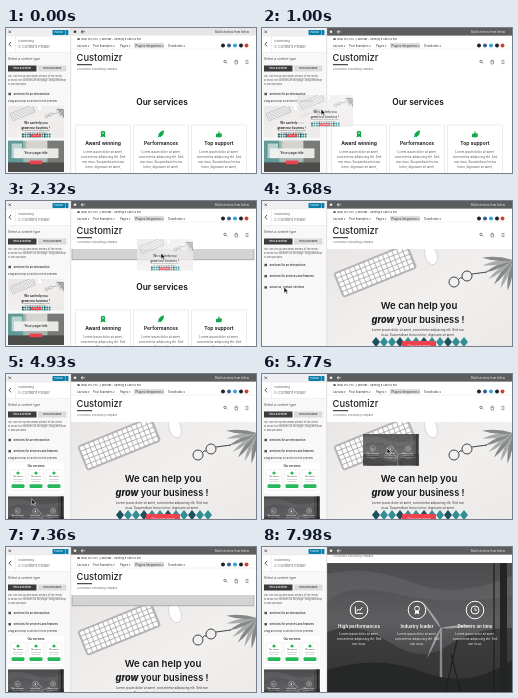
An HTML page for the animation above (8 s loop, 250x145 px).

```html
<!DOCTYPE html>
<html lang="en">
<head>
<meta charset="utf-8">
<title>Section builder</title>
<style>
html, body { margin: 0; width: 100%; height: 100%; overflow: hidden; background: #fff; }
svg { display: block; width: 100vw; height: 100vh; }
text { font-family: Inter, "Open Sans", sans-serif; white-space: pre; }
</style>
</head>
<body>
<svg id="stage" viewBox="0 0 250 145"></svg>
<script>
const LOOP = 8000, W = 185;
const stage = document.getElementById('stage');

const rect = (x, y, w, h, fill, more = '') =>
  `<rect x="${x}" y="${y}" width="${w}" height="${h}" fill="${fill}" ${more}/>`;
const dot = (x, y, r, fill, more = '') => `<circle cx="${x}" cy="${y}" r="${r}" fill="${fill}" ${more}/>`;
const path = (d, fill, more = '') => `<path d="${d}" fill="${fill}" ${more}/>`;
const line = (d, color, w, more = '') => path(d, 'none', `stroke="${color}" stroke-width="${w}" ${more}`);
const text = (x, y, size, str, fill = '#333', more = '') =>
  `<text x="${x}" y="${y}" font-size="${size}" fill="${fill}" ${more}>${str}</text>`;
const group = (body, more = '') => `<g ${more}>${body}</g>`;
const at = (x, y, more = '') => `transform="translate(${x} ${y})" ${more}`;
const MID = ' text-anchor="middle" ';
const BOLD = ' font-weight="600" ';
const lines = (x, y, step, size, rows, fill, more = MID) =>
  rows.map((row, i) => text(x, y + i * step, size, row, fill, more)).join('');

const LOREM = ['Lorem ipsum dolor sit amet,', 'consectetur adipiscing elit. Sed',
  'non risus. Suspendisse lectus', 'tortor, dignissim sit amet,'];
const COLUMNS = [32, 90, 148];

// Page sections, each drawn from its own top left corner
function services() {
  const icons = [
    dot(0, -1, 2.3, '#12a84a') + path('M-1.6 0L-2.6 3.6L0 2.4L2.6 3.6L1.6 0Z', '#12a84a') + dot(0, -1, .8, '#fff'),
    path('M3 -3.4C-.5 -3 -2 -1 -2.8 1.2L-.8 3.2C1.6 2 3 0 3 -3.4ZM-3.4 3.4L-2.4 1.6L-1.4 2.8Z', '#12a84a'),
    path('M-3 0L-.8 -.6L0 -3.4L.9 -.6L3 -.6L2.4 3.2L-3 3.2Z', '#12a84a')];
  const heads = ['Award winning', 'Performances', 'Top support'];
  return rect(0, 0, W, 110, '#fff') +
    text(91, 29.5, 8.4, 'Our services', '#111', MID + BOLD) +
    COLUMNS.map((x, i) => rect(x - 27.5, 50, 55, 60, '#fff', 'stroke="#e2e2e2" stroke-width=".6"') +
      group(icons[i], at(x, 59)) +
      text(x, 70.4, 5, heads[i], '#111', MID + BOLD) +
      lines(x, 77.6, 5, 3, LOREM, '#555')).join('');
}

function hero() {
  let keys = '', leaves = '', scales = '';
  for (let r = 0; r < 5; r++)
    for (let c = 0; c < 15; c++) keys += rect(2 + c * 5.1, 2 + r * 4.8, 4.2, 3.9, '#fdfdfd', 'rx=".6"');
  for (let i = 0; i < 7; i++)
    leaves += path('M0 0Q16 -4 31 0Q16 4 0 0Z', i % 2 ? '#a9aba9' : '#858987', `transform="translate(186 12) rotate(${100 + i * 14})"`);
  for (let i = 0; i < 24; i++)
    scales += path('M0 0L4 -5L8 0L4 5Z', i % 3 ? '#2f8f95' : '#1e4f5c', at(45 + i % 12 * 8, 94 + 8 * (i > 11)));
  return rect(0, 0, W, 110, 'url(#desk)') +
    group(rect(0, 0, 80, 27, '#b5b3b4', 'rx="3"') + keys, 'transform="translate(6 25) rotate(-22)"') +
    '<ellipse cx="104" cy="7" rx="6" ry="10" fill="#fff" stroke="#cfcdcc" stroke-width=".7" transform="rotate(-18 104 7)"/>' +
    leaves +
    dot(127, 34, 5, 'none', 'stroke="#444" stroke-width="1"') +
    dot(140, 28, 5, 'none', 'stroke="#444" stroke-width="1"') +
    line('M131.500 31.500Q133 29 135.500 30M145 26L160 24', '#444', 1) + scales +
    text(92, 60.7, 9.6, 'We can help you', '#161616', MID + BOLD) +
    text(91, 74.7, 9.2, '<tspan font-weight="800" font-style="italic">grow</tspan> your business !', '#161616', MID + BOLD) +
    lines(91, 83.2, 5, 3.05, ['Lorem ipsum dolor sit amet, consectetur adipiscing elit. Sed non',
      'risus. Suspendisse lectus tortor, dignissim sit amet.'], '#333') +
    rect(75, 93, 34, 9, '#f0414c', 'rx="1"') + text(92, 98.800, 3.4, 'Discover more', '#fff', MID);
}

const turbine = (x, y, s) => group(
  path('M-1 0L-1.500 95H1.500L1 0Z', '#bfc0c2') +
  [-35, 85, 205].map(a => path('M0 0Q2.5 -9 0 -34Q-2 -9 0 0Z', '#cfd0d2', `transform="rotate(${a})"`)).join(''),
  `transform="translate(${x} ${y}) scale(${s})" opacity=".6"`);

function features() {
  const icons = [
    line('M-3.6 -3.4V3.4H3.8M-2.4 1.4L-.6 -1L.8 .4L3.4 -2.8', '#fff', 1),
    dot(0, -1.4, 2.4, 'none', 'stroke="#fff"') + path('M-1.7 .6L-2.3 4.4L0 3.2L2.3 4.4L1.7 .6Z', '#fff'),
    dot(0, 0, 4, 'none', 'stroke="#fff"') + line('M0 -2.4V.3H2', '#fff', .9)];
  const heads = ['High performances', 'Industry leader', 'Delivers on time'];
  return rect(0, 0, W, 132, 'url(#fog)') +
    path('M0 12Q40 2 84 20T185 14V34Q120 44 70 32T0 40Z', '#6c6b6d', 'opacity=".45"') +
    path('M0 70Q30 58 62 80T120 84T185 66V132H0Z', '#353536', 'opacity=".75"') +
    turbine(114, 66, 1) +
    path('M0 108Q50 92 96 110T185 98V132H0Z', '#262827') +
    line('M118 132L130 78M134 132L124 92M167 0V132', '#1d1f1e', 1.2) + rect(173, 0, 7, 132, '#232524') +
    COLUMNS.map((x, i) => group(dot(0, 0, 8.8, 'none', 'stroke="#fff" stroke-width="1"') + icons[i], at(x, 48)) +
      text(x, 65.6, 4.5, heads[i], '#fff', MID + BOLD) +
      lines(x, 73.2, 4.700, 3, [LOREM[0], LOREM[1], 'non risus.'], '#f4f4f4')).join('');
}

function office() {
  return rect(0, 0, W, 98, '#a9b3b0') + rect(0, 0, 50, 98, '#5f9a98') + rect(60, 0, 70, 34, '#d5d4cf') +
    rect(130, 0, 55, 98, '#777a77') + rect(0, 72, W, 32, '#4c4d4b') + rect(12, 10, 34, 48, '#bdd3d0') +
    rect(20, 26, 146, 32, '#f4f4f2', 'opacity=".9"') +
    text(92, 46, 11, 'Your page title', '#333', MID + BOLD) + rect(72, 66, 40, 12, '#f0414c');
}

const header = () => rect(0, 0, W, 40, '#fff') +
  text(6, 4.3, 2.5, '☎ (555) 010-724  ◷ Monday - Opening 9 AM to 6 PM', '#222') +
  rect(63, 6.9, 30, 5.2, '#dedede') +
  [[6, 'Layouts ▾'], [22, 'Post Examples ▾'], [49, 'Pages ▾'], [64.5, 'Plugins Integrations ▾'], [97, 'Downloads ▾']]
    .map(([x, s]) => text(x, 10.6, 2.8, s, '#333')).join('') +
  [['#222', 152], ['#3b5998', 158], ['#38a1db', 164], ['#222', 170], ['#d0402f', 175.5]]
    .map(([c, x]) => dot(x, 9.4, 2, c)).join('') +
  line('M0 13H185', '#e4e4e4', .5) +
  text(5.5, 25, 9.4, 'Customizr', '#222', 'font-weight="500"') + rect(6, 28.2, 15, 1, '#222') +
  text(6, 34, 2.7, 'A business consulting company', '#666') +
  dot(154, 25.4, 1.2, 'none', 'stroke="#444" stroke-width=".6"') + line('M155 26.4L156.2 27.6', '#444', .6) +
  line('M163.8 25.2H166.8L166.4 28H164.2ZM164.4 25Q165.3 22.6 166.2 25', '#444', .5) +
  line('M174.500 24.4H177.500M174.500 26H177.500M174.500 27.6H177.500', '#444', .5);

const bar = (fill, ink) => rect(65, 0, W, 7.6, fill) + dot(69, 3.8, 1.3, ink) +
  line('M75 3.8H79M77 2.2L75 3.8L77 5.4', ink, .7) +
  text(243, 4.9, 2.8, 'Build sections from below', ink, 'text-anchor="end"');

const panelTop = rect(0, 0, 64.5, 61, '#f8f8f8') + rect(0, 0, 64.5, 8, '#efeef2') +
  line('M2.5 2.5L5 5M5 2.5L2.5 5', '#444', .7) +
  rect(46.5, 2, 12.500, 5, '#0a7ea8', 'rx=".8"') + text(52.7, 5.4, 2.6, 'Publish', '#fff', MID) +
  rect(59.4, 2, 3, 5, '#0a7ea8', 'rx=".6"') +
  rect(0, 8, 64.5, 16.4, '#fff') + line('M0 8H64.5M0 24.4H64.5M9.5 8V24.4', '#e2e2e2', .5) +
  line('M5 14L3 16.2L5 18.4', '#444', .9) +
  text(12, 14.2, 2.7, 'Customizing', '#555') + text(12, 19.8, 4, '⠿ Content Picker', '#666') +
  text(2, 32, 3.2, 'Select a content type', '#444') +
  rect(2, 37.5, 28.5, 6, '#3c3c3c') + text(16.2, 41.4, 2.7, 'Pick a section', '#fff', MID + BOLD) +
  rect(32, 37.5, 28.500, 6, '#dcdcdc') + text(46.2, 41.4, 2.7, 'Pick a module', '#444', MID + BOLD) +
  lines(2, 49, 4, 2.5, ['Tip: use the <tspan text-decoration="underline">up and down arrows of the menu</tspan>',
    'to move the sections on the page. Drag and drop', 'is also possible.'], '#444', 'font-style="italic"');

const fold = (id, label) => group(rect(0, -4, 64.5, 8, '#f8f8f8') +
  rect(2.5, -1.2, 2.4, 2.4, '#444') + text(7.5, 1, 2.7, label, '#333', BOLD), `id="${id}"`);
const hint = y => text(2, y, 2.7, 'Drag and drop a section in the preview', '#333');
const thumb = (name, x, y) =>
  group(`<use href="#${name}" transform="scale(.304)"/>`, at(x, y, 'clip-path="url(#card)"'));

const miniServices = group(rect(0, 0, 56, 30, '#fff') + text(28, 4, 2.8, 'Our services', '#222', MID + BOLD) +
  [10, 28, 46].map(x => rect(x - 8, 6.500, 16, 21, '#fff', 'stroke="#e2e2e2" stroke-width=".5" rx="1"') +
    dot(x, 9.8, 1.6, '#27b85c') + text(x, 14.3, 1.7, 'Our service', '#333', MID + BOLD) +
    lines(x, 17, 2, 1, ['Lorem ipsum dolor sit', 'amet, consectetur'], '#777') +
    rect(x - 6.500, 21, 13, 3.8, '#27b85c', 'rx="1.200"')).join(''), at(2, 8));

stage.innerHTML = `<defs>
  <linearGradient id="desk" x2="1" y2="1"><stop stop-color="#e9e6e5"/><stop offset=".5" stop-color="#f2f0ef"/><stop offset="1" stop-color="#ebe8e8"/></linearGradient>
  <linearGradient id="fog" x2="0" y2="1"><stop stop-color="#4b4a4c"/><stop offset=".45" stop-color="#5e5d60"/><stop offset="1" stop-color="#303131"/></linearGradient>
  <clipPath id="card"><rect width="56" height="31.5"/></clipPath>
  <clipPath id="view"><rect x="65" y="7.6" width="185" height="138"/></clipPath>
  <clipPath id="side"><rect width="64.5" height="145"/></clipPath>
  <clipPath id="intro"><rect id="introClip" width="65" height="0"/></clipPath>
  <clipPath id="more"><rect id="moreClip" width="65" height="0"/></clipPath>
  <g id="heroArt">${hero()}</g><g id="featureArt">${features()}</g><g id="officeArt">${office()}</g>
</defs>` +
  rect(0, 0, 250, 145, '#fff') +
  group(group(
    group(services(), 'id="services"') + group('<use href="#heroArt"/>', 'id="hero"') +
    group('<use href="#featureArt"/>', 'id="features"') +
    group(rect(1, .4, 182, 11.4, '#d3d3d3', 'stroke="#9a9a9a" stroke-width=".7"'), 'id="zone"') + header(),
    'id="page"'), 'clip-path="url(#view)"') +
  bar('#e6e6e6', '#333') + group(bar('#5b5d5e', '#eee'), 'id="darkBar"') +
  group(rect(0, 0, 64.5, 145, '#f8f8f8') +
    group(group(hint(3) + thumb('heroArt', 2, 7) + thumb('officeArt', 2, 41.5), 'clip-path="url(#intro)"'), 'id="introBody"') +
    group(group(hint(4) + miniServices + thumb('featureArt', 2, 41), 'clip-path="url(#more)"'), 'id="moreBody"') +
    fold('fold0', 'Sections for an introduction') + fold('fold1', 'Sections for services and features') +
    fold('fold2', 'About us, contact sections') + panelTop, 'clip-path="url(#side)"') +
  line('M64.7 0V145', '#d0d0d0', .6) +
  group(thumb('heroArt', 0, 0), 'id="ghostA" opacity=".75"') +
  group(thumb('featureArt', 0, 0), 'id="ghostB" opacity=".9"') +
  path('M0 0V6L1.5 4.7L2.5 7L3.5 6.5L2.5 4.4H4.3Z', '#111', 'id="cursor" stroke="#fff" stroke-width=".5"');

const node = {};
stage.querySelectorAll('[id]').forEach(el => node[el.id] = el);

const progress = (t, a, b) => Math.min(1, Math.max(0, (t - a) / (b - a)));
function ramp(t, a, b) {
  const k = progress(t, a, b);
  return k * k * (3 - 2 * k);
}
function along(t, stops) {
  const i = Math.max(1, stops.findIndex((s, n) => s[0] > t || n === stops.length - 1));
  const [a, b] = [stops[i - 1], stops[i]], k = progress(t, a[0], b[0]);
  return [a[1] + (b[1] - a[1]) * k, a[2] + (b[2] - a[2]) * k];
}
const move = (id, x, y) => node[id].setAttribute('transform', `translate(${x} ${y})`);
const show = (id, on) => node[id].style.display = on ? '' : 'none';
const fade = (id, k) => node[id].setAttribute('opacity', k);

const GRAB_A = 700, DROP_A = 2470, GRAB_B = 5000, DROP_B = 6780;
const pathA = [[GRAB_A, 2, 78], [1000, 35, 67], [1640, 113, 43], [2200, 131, 38]];
const pathB = [[GRAB_B, 2, 121], [5770, 101, 60], [6500, 131, 44]];
const pointer = [[DROP_A, 155, 52], [2600, 155, 52], [3250, 22, 66], [3640, 22, 86], [4120, 22, 86],
  [4300, 24, 76], [4600, 24, 76], [GRAB_B, 26, 135]];

function draw(now) {
  const t = now % LOOP;
  const dragA = t >= GRAB_A && t < DROP_A, dragB = t >= GRAB_B && t < DROP_B;
  const a = along(t, pathA), b = along(t, pathB);
  show('ghostA', dragA); move('ghostA', ...a);
  show('ghostB', dragB); move('ghostB', ...b);
  show('cursor', t >= GRAB_A && t < DROP_B);
  move('cursor', ...(dragA ? [a[0] + 24, a[1] + 14] : dragB ? [b[0] + 24, b[1] + 14] : along(t, pointer)));
  fade('darkBar', ramp(t, 30, 500));

  const heroIn = ramp(t, 2800, 3320), featuresIn = ramp(t, 7390, 7570);
  const gap = 12 * (ramp(t, 1550, 1750) * (heroIn === 0) + ramp(t, 6050, 6250) * (featuresIn === 0));
  const heroTop = 39 + gap + 132 * (featuresIn > 0);
  show('hero', heroIn > 0); fade('hero', heroIn);
  show('features', featuresIn > 0); fade('features', featuresIn);
  show('zone', gap > 1);
  move('page', 65, 8 - 32 * ramp(t, 7740, 7985));
  move('zone', 0, 39);
  move('features', 0, 39);
  move('hero', 0, heroTop);
  move('services', 0, heroTop + 110 * (heroIn > 0));

  const close = ramp(t, 3280, 3560), open = ramp(t, 4250, 4600);
  const intro = 74 * (1 - close), more = 76 * open;
  const y0 = 66 - 2 * close + 2 * open, y1 = y0 + 11.2 + intro;
  move('fold0', 0, y0); move('introBody', 0, y0 + 5);
  move('fold1', 0, y1); move('moreBody', 0, y1 + 4);
  move('fold2', 0, y1 + 11.2 + more);
  node.introClip.setAttribute('height', intro);
  node.moreClip.setAttribute('height', more);
}

(function frame() {
  draw(performance.now());
  requestAnimationFrame(frame);
})();
</script>
</body>
</html>
```
